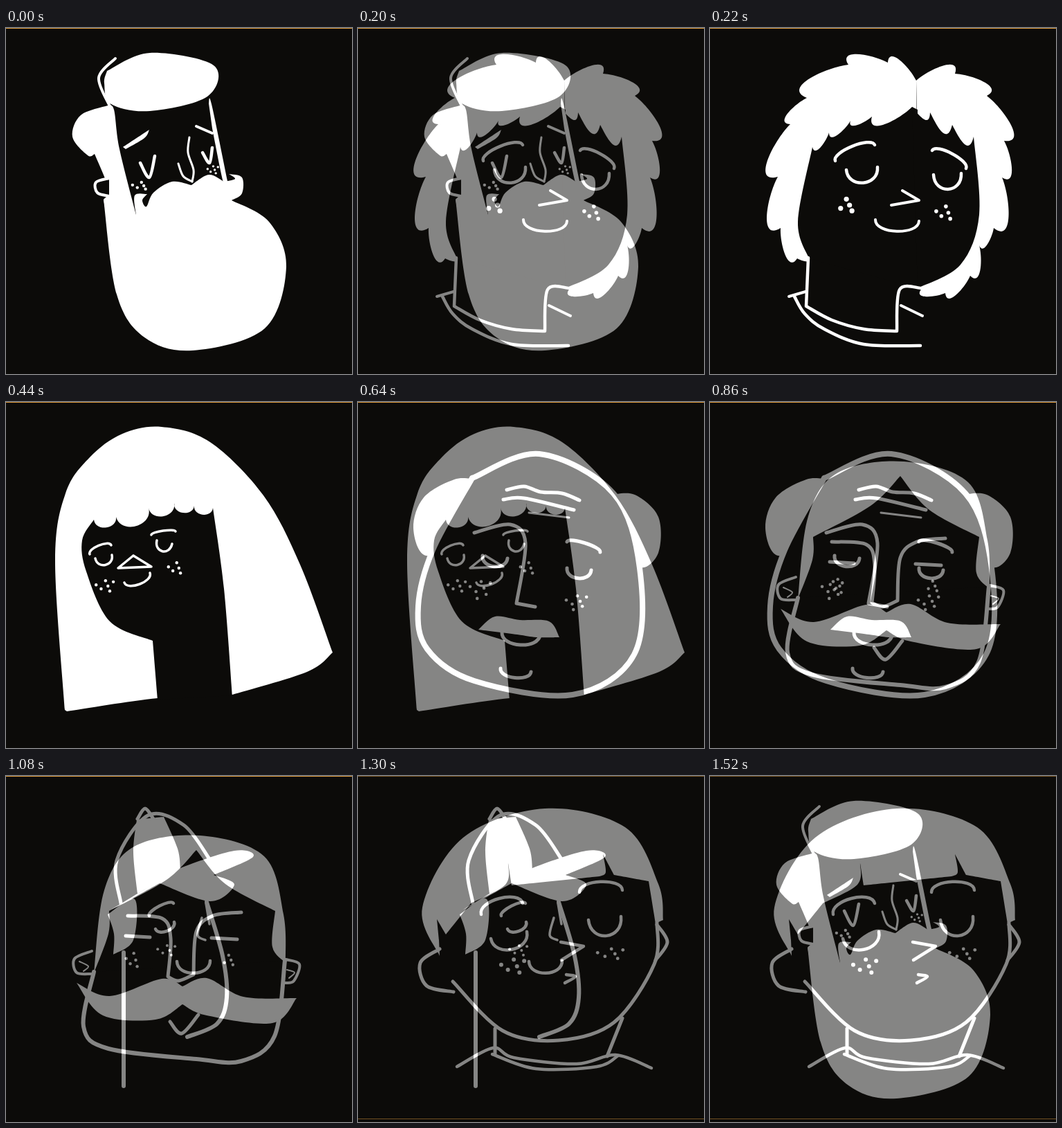
Write an HTML page that moves like this. It is 500 by 500 pixels and loops after 1540 ms.

```html
<!DOCTYPE html>
<html lang="en">
<head>
<meta charset="utf-8">
<title>Faces</title>
<style>
  html, body { margin: 0; width: 100%; height: 100%; overflow: hidden; background: #0c0b09; }
  svg { display: block; width: 100vw; height: 100vh; }
</style>
</head>
<body>
<svg id="stage" viewBox="0 0 500 500"></svg>
<script>
const INK = '#fff', BG = '#0c0b09', EDGE = '#dc9a3c';
const HOLD = 200, MIX = 20;

const points = text => text.trim().split(/\s+/).map(p => p.split(',').map(Number));
const join = (...paths) => paths.map((d, i) => (i ? 'L' + d.slice(1) : d)).join('');

// Smooth curve through "x,y" points; "|" makes a sharp corner.
function curve(text) {
  let last, d = '';
  for (const run of text.split('|').map(points)) {
    const p = last ? [last, ...run] : run;
    d = d || 'M' + p[0];
    for (let i = 0; i < p.length - 1; i++) {
      const a = p[i - 1] || p[i], b = p[i], c = p[i + 1], e = p[i + 2] || c;
      const near = [0, 1].map(k => b[k] + (c[k] - a[k]) / 6);
      const far = [0, 1].map(k => c[k] - (e[k] - b[k]) / 6);
      d += `C${near} ${far} ${c}`;
    }
    last = p[p.length - 1];
  }
  return d;
}

// One bump per pair of points: `start` and `end` are [along, outward] shares of the chord.
function bumps(text, start, end) {
  const p = points(text);
  return 'M' + p[0] + p.slice(1).map((q, i) => {
    const [x, y] = p[i], dx = q[0] - x, dy = q[1] - y;
    const at = (px, py, [along, out]) => [px + along * dx - out * dy, py + along * dy + out * dx];
    return `C${at(x, y, start)} ${at(...q, end)} ${q}`;
  }).join('');
}

// Bows sag by a share of their width; locks of hair droop past their lower end.
const bowPath = (text, sag) => bumps(text, [0, sag * 4 / 3], [0, sag * 4 / 3]);
const locks = (text, side, size = 0.45) => bumps(text, [0.35, side * 0.22], [0.25, side * size]);

const paint = (d, color) => `<path d="${d}Z" fill="${color}"/>`;
const stroke = (w, d, inside = 'none') =>
  `<path d="${d}" fill="${inside}" stroke="${INK}" stroke-width="${w}" stroke-linecap="round" stroke-linejoin="round"/>`;
const fill = text => paint(curve(text), INK);
const line = (w, ...all) => all.map(text => stroke(w, curve(text))).join('');
const shell = (w, text) => stroke(w, curve(text), BG);
const bow = (w, text, sag) => stroke(w, bowPath(text, sag));
const rule = y => `<rect y="${y}" width="500" height="1" fill="${EDGE}"/>`;

// Sunflower scatter inside an ellipse.
const freckles = (n, cx, cy, rx, ry, r) => Array.from({ length: n }, (_, i) => {
  const turn = i * 2.4, reach = Math.sqrt((i + 0.5) / n);
  return `<circle cx="${cx + rx * reach * Math.cos(turn)}" cy="${cy + ry * reach * Math.sin(turn)}" r="${r}" fill="${INK}"/>`;
}).join('');

const longBeard = [
  rule(0),
  fill('147,112 | 156,118 164,175 188,270 | 150,300 | 141,248 | 148,232 128,182 | 118,184 96,157 108,126 147,112'),
  fill('141,248 160,385 200,447 270,466 374,434 405,345 380,280 326,249 | 341,239 341,216 322,211 | 331,218 315,222 | 293,212 268,227 | 240,222 213,238 203,258 197,249 204,240 | 186,242 188,270'),
  fill('146,62 208,36 300,54 291,99 208,120 152,110 142,80 146,62'),
  line(4, '158,44 134,72 150,113'),
  shell(4, '149,217 130,223 132,238 149,243'),
  fill('293,109 297,110 320,221 | 314,223 298,145'),
  fill('169,172 207,147 | 200,159 173,175'),
  line(4, '275,142 298,152'),
  line(4.5, '194,195 207,216 215,185', '284,180 294,195 298,173'),
  line(3, '265,158 263,180 271,205 269,222', '249,196 256,214 269,222'),
  freckles(5, 195, 228, 13, 7, 2.2),
  freckles(6, 299, 205, 9, 8, 1.7)
].join('');

const shaggy = [
  rule(0),
  paint(join(locks('298,76 257,50 200,53 140,101 116,139 98,215 102,289 126,333 143,333', 1), 'M300,250'), INK),
  paint(locks('298,76 354,66 400,98 425,163 422,216 410,289 389,314 376,358 340,383 305,378', -1), INK),
  paint(join(locks('292,114 234,128 203,134 172,151 148,172', -1), curve('148,172 127,280 143,333 | 300,376 | 300,118')), BG),
  paint(join(locks('292,114 318,122 350,140 381,157', 1, 0.9), curve('381,157 389,270 362,342 300,376')), BG),
  line(4.5, '142,332 139,402 | 176,422 222,435 270,438 | 274,378 305,376', '122,388 137,413 165,435 222,457 304,459'),
  line(4, '114,388 138,381', '276,401 307,416', '278,235 302,249 | 262,256'),
  bow(4.5, '181,192 238,169', -0.17),
  bow(4.5, '321,177 370,203', -0.17),
  bow(4.5, '197,205 242,201', 0.46),
  bow(4.5, '323,212 363,210', 0.55),
  bow(4, '239,277 302,279', 0.25),
  freckles(4, 196, 256, 16, 11, 3.6),
  freckles(5, 340, 267, 14, 13, 2.8)
].join('');

const longHair = [
  rule(0),
  fill('85,445 71,230 86,132 121,80 168,46 225,36 295,58 372,135 425,235 472,362 | 435,390 327,423 | 219,428 88,447'),
  paint(join(
    bowPath('127,170 159,166 206,153 243,146 272,150 299,153', 0.42),
    curve('299,153 315,270 327,424 | 219,430 | 212,345 | 150,317 116,245 110,200 127,170')
  ), BG),
  bow(3.5, '121,220 152,207', -0.2),
  bow(3.5, '129,226 153,221', 0.5),
  bow(3.5, '210,192 245,187', -0.1),
  bow(3.5, '218,200 240,205', 0.6),
  line(3.5, '184,222 162,240 | 210,238 | 184,222'),
  bow(3.5, '171,261 208,247', 0.25),
  freckles(6, 143, 266, 15, 12, 2.2),
  freckles(5, 246, 240, 12, 11, 2.2)
].join('');

const bald = [
  rule(0),
  fill('170,112 139,112 95,138 80,182 98,222 150,200'),
  fill('365,134 400,134 434,166 434,218 407,239 375,200'),
  shell(8, '165,110 262,75 369,132 407,240 399,365 310,423 168,403 100,357 87,295 108,214 165,110'),
  line(5, '215,127 240,122 264,130 295,132 320,142', '210,141 240,139 312,156'),
  line(3, '247,160 305,167'),
  line(5, '168,189 220,177 242,204 229,291 | 256,296'),
  bow(5, '302,202 350,217', -0.12),
  bow(5, '302,240 337,243', 0.38),
  bow(5, '180,222 216,226', 0.38),
  fill('174,329 198,310 234,315 276,317 291,340 | 258,340 230,336 174,329'),
  bow(5, '208,333 263,336', 0.3),
  bow(5, '206,385 250,390', 0.25),
  freckles(7, 177, 269, 19, 16, 2.3),
  freckles(7, 316, 288, 19, 13, 2.3)
].join('');

const walrus = [
  rule(0),
  shell(4, '124,253 99,264 102,284 123,286'),
  shell(4, '404,265 424,272 416,296 403,299'),
  line(2, '106,268 119,275 112,282', '406,280 417,284 409,292'),
  shell(6, '127,283 112,362 148,394 275,409 340,412 388,376 403,267'),
  fill('127,285 142,165 185,102 280,86 373,116 401,200 404,270 | 385,247 389,195 | 317,156 275,107 | 232,150 149,195 | 148,228 127,285'),
  fill('102,299 150,318 225,293 255,304 | 290,292 343,319 420,321 | 385,357 290,346 255,330 | 216,352 140,346 102,299'),
  line(5, '176,202 226,206 238,235 234,290 | 249,296 271,287 | 275,225 299,202 340,197'),
  line(5, '173,231 208,233', '297,234 334,236', '237,355 254,372 278,345'),
  freckles(5, 184, 266, 11, 14, 2.2),
  freckles(4, 321, 266, 12, 9, 2.2)
].join('');

const cap = [
  rule(0),
  fill('189,63 228,59 | 248,105 252,136 | 190,170 | 184,110 189,63'),
  line(5, '166,184 160,122 205,57 257,71 294,120', '190,62 201,47 213,62'),
  fill('152,193 210,158 250,134 330,108 357,117 300,143 | 330,157 295,181 222,155 | 168,185'),
  fill('147,200 186,178 184,237 155,258 | 156,228 147,200'),
  line(6, '170,255 170,448', '290,182 313,260 319,320 305,358 262,377'),
  line(3.5, '283,205 277,230 288,237', '289,184 294,214'),
  bow(4.5, '207,202 242,184', -0.15),
  bow(4.5, '216,221 243,211', 0.3),
  bow(4.5, '247,268 295,267', 0.36),
  freckles(6, 232, 252, 15, 11, 2)
].join('');

const bowlCut = [
  rule(495),
  line(5, '118,250 90,270 99,303 138,312', '432,215 447,240 430,266'),
  line(5, '137,297 209,368 290,382 370,356 428,272 432,212'),
  line(5, '198,365 198,402', '382,350 360,405'),
  fill('118,260 93,190 152,89 270,47 386,74 434,156 441,208 | 430,213 | 420,152 | 370,143 | 354,113 | 358,139 349,145 | 222,158 | 217,126 | 213,157 163,184 | 127,229 | 114,207 | 117,237'),
  line(4.5, '143,420 195,393 225,407 316,416 372,403 424,422', '194,402 257,423 345,420 376,404'),
  bow(4.5, '178,200 238,184', -0.25),
  bow(4.5, '320,168 382,165', -0.22),
  bow(4.5, '192,235 244,225', 0.4),
  bow(4.5, '333,208 380,203', 0.54),
  line(4.5, '293,240 326,246 | 294,266', '301,287 314,290 299,299'),
  freckles(6, 224, 275, 20, 15, 3),
  freckles(6, 365, 257, 22, 11, 2.4)
].join('');

const faces = [longBeard, shaggy, longHair, bald, walrus, cap, bowlCut];
const step = HOLD + MIX, loop = faces.length * step;
const stage = document.getElementById('stage');

// Faces stack upwards: each mixes in at half strength, then covers the one below.
faces.forEach((art, i) => {
  const g = document.createElementNS('http://www.w3.org/2000/svg', 'g');
  g.innerHTML = `<rect width="500" height="500" fill="${BG}"/>${art}`;
  stage.append(g);
  if (i === 0) return;
  const start = i * step;
  const isLast = i === faces.length - 1;
  const keys = [[0, 0], [start - MIX, 0.5], [start, 1], [start + HOLD, isLast ? 0.5 : 1]];
  if (!isLast) keys.push([start + step, 0]);
  keys.push([loop, 0]);
  g.animate(
    keys.map(([t, opacity]) => ({ offset: t / loop, opacity, easing: 'steps(1, end)' })),
    { duration: loop, iterations: Infinity }
  );
});
</script>
</body>
</html>
```
